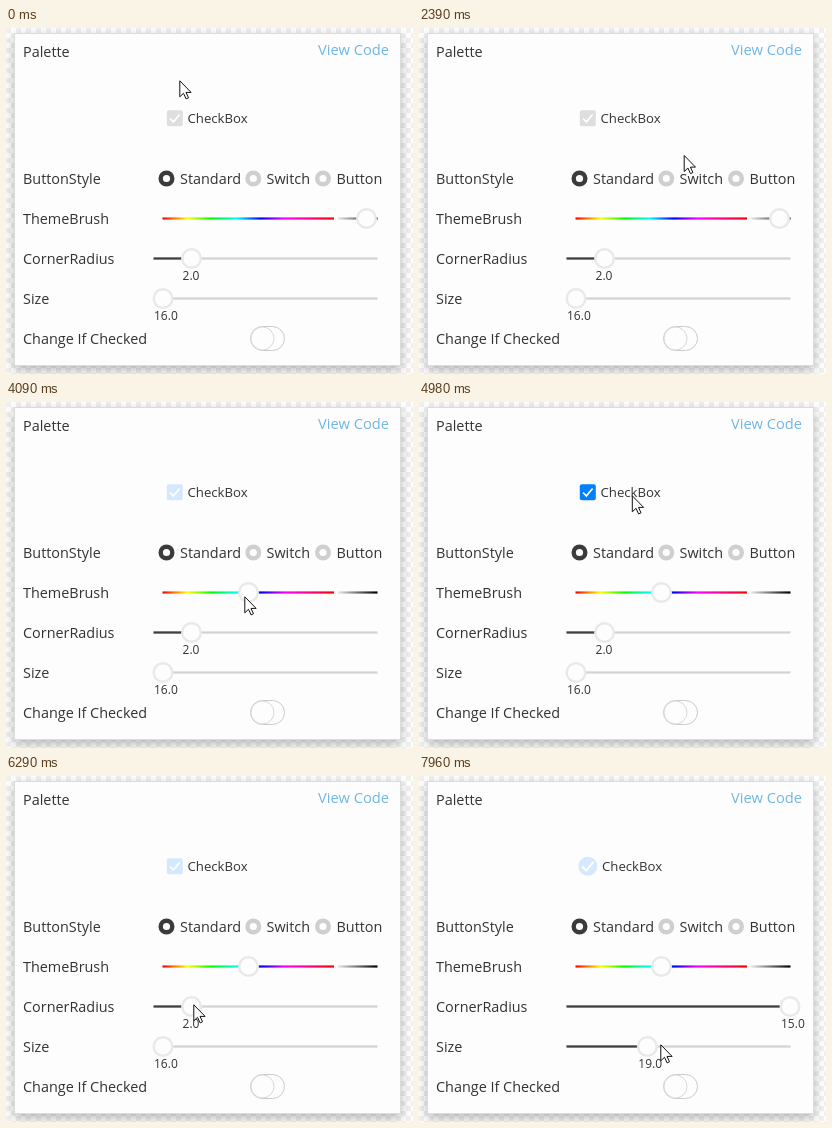
Animation of 407x346 px, one loop 8000 ms. Source, as an HTML page:

```html
<!DOCTYPE html>
<html lang="en">
<head>
<meta charset="utf-8">
<title>CheckBox palette</title>
<style>
  html, body { margin: 0; width: 100%; height: 100%; overflow: hidden; background: #fff; }
  svg { display: block; width: 407px; height: 346px; font: 14.4px "Open Sans", "Noto Sans", sans-serif; fill: #333; }
  .card { fill: #fdfdfd; stroke: #dcdcdc; filter: drop-shadow(0 4px 6px rgba(0, 0, 0, .28)); }
  .link { fill: #70b7e6; font-size: 14.7px; }
  .track { fill: #d3d3d3; }
  .fill { fill: #404040; }
  .thumb { fill: #fdfdfd; stroke: #e9e9e9; stroke-width: 2.4; }
  .value { font-size: 12px; }
  .radio { fill: #fdfdfd; stroke: #cfcfcf; stroke-width: 4.4; }
  .radio.on { stroke: #3b3b3b; }
  .toggle { fill: #fdfdfd; stroke: #cbcbcb; }
  .knob { stroke: #d8d8d8; }
</style>
</head>
<body>
<svg viewBox="0 0 407 346">
  <defs>
    <pattern id="checker" width="10" height="10" patternUnits="userSpaceOnUse">
      <path d="M0 0h5v10h5v-5H0z" fill="#f1f1f1"/>
    </pattern>
    <linearGradient id="hues" gradientUnits="userSpaceOnUse" x1="157" x2="328" y1="0" y2="0"></linearGradient>
    <linearGradient id="grays" gradientUnits="userSpaceOnUse" x1="328" x2="371" y1="0" y2="0">
      <stop stop-color="#fff"/>
      <stop offset="1"/>
    </linearGradient>
  </defs>

  <rect width="407" height="346" fill="url(#checker)"/>
  <rect class="card" x="8.5" y="5.5" width="386" height="332"/>

  <text x="17" y="29">Palette</text>
  <text class="link" x="312" y="27">View Code</text>
  <text x="17" y="156">ButtonStyle</text>
  <text x="17" y="196">ThemeBrush</text>
  <text x="17" y="236">CornerRadius</text>
  <text x="17" y="276">Size</text>
  <text x="17" y="316">Change If Checked</text>

  <rect id="box"/>
  <path id="tick" d="M-4.8 .2-1.4 3.6 4.8-3.8" fill="none" stroke="#fff" stroke-width="1.7"/>
  <text id="label" y="95" font-size="13.2">CheckBox</text>

  <circle class="radio on" cx="160.5" cy="150.5" r="5.8"/>
  <text x="174" y="156">Standard</text>
  <circle class="radio" cx="247.3" cy="150.5" r="5.8"/>
  <text x="260.5" y="156">Switch</text>
  <circle class="radio" cx="317" cy="150.5" r="5.8"/>
  <text x="330.5" y="156">Button</text>

  <rect x="156.5" y="189.4" width="171.5" height="2.2" fill="url(#hues)"/>
  <rect x="332" y="189.4" width="39.5" height="2.2" fill="url(#grays)"/>
  <circle id="hue" class="thumb" cy="190.5" r="9.3"/>

  <g id="radius" transform="translate(0 230.5)"></g>
  <g id="size" transform="translate(0 270.5)"></g>

  <rect class="toggle" x="244.5" y="298.5" width="34" height="24" rx="12"/>
  <circle class="toggle knob" cx="256.5" cy="310.5" r="11.5"/>

  <path id="cursor" d="M.8.8v16l3.7-3.5 2.6 5.6 2.4-1.1-2.5-5.4h5.1z" fill="#fff" stroke="#111"/>
</svg>

<script>
  const LOOP = 8000, LAG = 80, MIN_X = 157, MAX_X = 371, HUE_END = 328;

  const glide = u => u * u * (3 - 2 * u);
  const pull = u => 1 - (1 - u) ** 2.3;

  const move = (start, end, x, y, ease = glide) => ({ start, end, x, y, ease });
  const hueDrag = move(2900, 3760, 238, 194, pull);
  const radiusDrag = move(6570, 7030, 386, 233, pull);
  const sizeDrag = move(7680, 7960, 241, 268, pull);

  const moves = [
    move(290, 760, 206.5, 88),
    move(2060, 2840, 356, 188),
    hueDrag,
    move(4090, 4980, 212.5, 93),
    move(5720, 6290, 187, 228),
    radiusDrag,
    move(7140, 7180, 378, 233),
    move(7180, 7620, 163, 274),
    sizeDrag
  ];
  const isChecked = t => (t >= 950 && t < 1920) || (t >= 4820 && t < 5720);

  const $ = id => document.getElementById(id);
  const set = (el, attrs) => { for (const k in attrs) el.setAttribute(k, attrs[k]); };
  const clamp = (v, lo, hi) => Math.min(hi, Math.max(lo, v));

  function pointer(t) {
    let x = 173, y = 52;
    for (const m of moves) {
      const k = m.ease(clamp((t - m.start) / (m.end - m.start), 0, 1));
      x += (m.x - x) * k;
      y += (m.y - y) * k;
    }
    return { x, y };
  }

  // A dragged thumb trails the pointer
  const dragged = (t, drag, offset) => pointer(clamp(t - LAG, drag.start, drag.end)).x + offset;

  function slider(id, min, max) {
    const g = $(id);
    g.innerHTML = '<rect class="track" x="147.5" y="-1.1" width="224" height="2.2"/>'
      + '<rect class="fill" x="147.5" y="-1.1" height="2.2"/>'
      + '<circle class="thumb" r="9.3"/><text class="value" y="21.5"></text>';
    const [, fill, thumb, text] = g.children;
    return x => {
      const span = (MAX_X - MIN_X) / (max - min);
      const value = clamp(Math.round(min + (x - MIN_X) / span), min, max);
      const at = MIN_X + (value - min) * span;
      set(fill, { width: at - 147.5 });
      set(thumb, { cx: at });
      set(text, { x: at - 9 });
      text.textContent = value.toFixed(1);
      return value;
    };
  }

  const setRadius = slider('radius', 0, 15);
  const setSize = slider('size', 16, 25);

  // Seven equal bands; the last two share the step from magenta to red
  function hueColor(u) {
    const band = u * 7;
    return `hsl(${60 * Math.min(band, 5) + 30 * Math.max(band - 5, 0)}, 100%, 50%)`;
  }

  function themeColor(x) {
    if (x <= HUE_END) return hueColor((x - MIN_X) / (HUE_END - MIN_X));
    const v = Math.round(255 * (MAX_X - x) / (MAX_X - HUE_END));
    return `rgb(${v}, ${v}, ${v})`;
  }

  $('hues').innerHTML = Array.from({ length: 8 }, (_, i) =>
    `<stop offset="${i / 7}" stop-color="${hueColor(i / 7)}"/>`).join('');

  function draw(t) {
    const hueX = dragged(t, hueDrag, 4.5);
    const radius = setRadius(dragged(t, radiusDrag, -1.5));
    const size = setSize(dragged(t, sizeDrag, -6));
    const grow = (size - 16) / 2;
    const tip = pointer(t);

    set($('hue'), { cx: hueX });
    set($('box'), {
      x: 160.8 - grow, y: 82.2 - grow, width: size, height: size,
      rx: Math.min(radius, size / 2), fill: themeColor(hueX), 'fill-opacity': isChecked(t) ? 1 : .16
    });
    set($('tick'), { transform: `translate(168.8 90.3) scale(${size / 16})` });
    set($('label'), { x: 181.5 + grow });
    set($('cursor'), { transform: `translate(${tip.x} ${tip.y})` });
  }

  const began = performance.now();
  function tick() {
    draw((performance.now() - began) % LOOP);
    requestAnimationFrame(tick);
  }
  tick();
</script>
</body>
</html>
```
